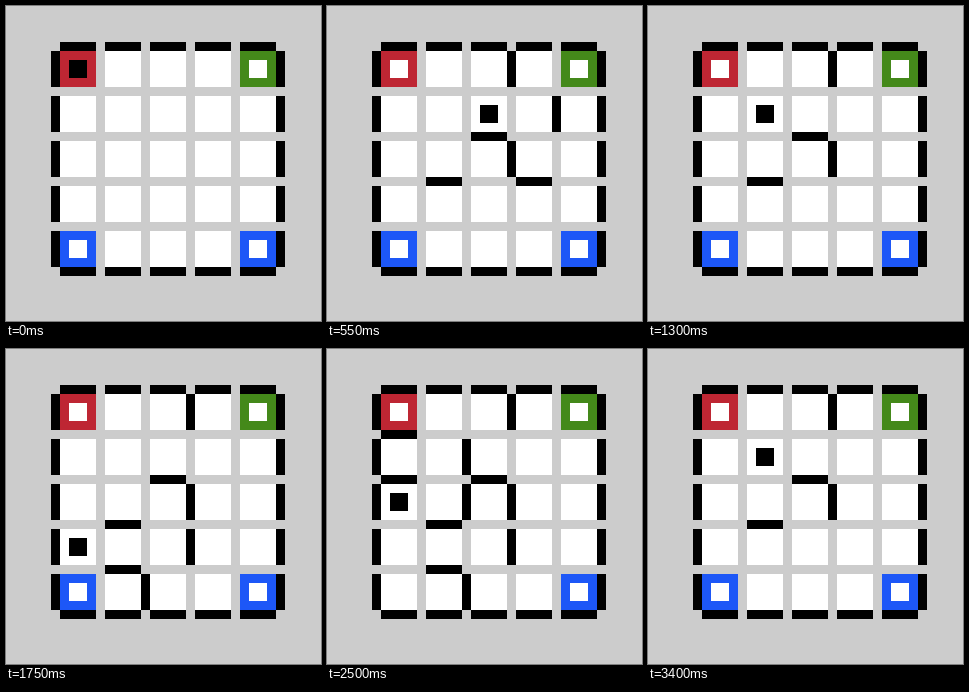
These frames come from a looping animation (315 px wide and 315 px high, 3.55 s). An HTML page:

```html
<!DOCTYPE html>
<html lang="en">
<head>
<meta charset="utf-8">
<title>Maze search</title>
<style>
  html, body { margin: 0; width: 100%; height: 100%; overflow: hidden; background: #ccc; }
  svg { display: block; width: 100vw; height: 100vh; }
</style>
</head>
<body>
<svg id="stage" viewBox="0 0 315 315" shape-rendering="crispEdges"></svg>
<script>
const UNIT = 9, TILE = 45, SIZE = 5, LOOP = 3550;
const stage = document.getElementById('stage');
const left = col => 54 + TILE * col;
const top_ = row => 45 + TILE * row;

function rect(x, y, w, h, fill) {
  const el = document.createElementNS('http://www.w3.org/2000/svg', 'rect');
  Object.entries({ x, y, width: w, height: h, fill }).forEach(([k, v]) => el.setAttribute(k, v));
  return stage.appendChild(el);
}
const square = (col, row, fill) => rect(left(col), top_(row), 36, 36, fill);
const core = (col, row, fill) => rect(left(col) + UNIT, top_(row) + UNIT, 18, 18, fill);

// A wall lies on the right (v) or bottom (h) side of a cell.
function wall(name) {
  const col = +name[1], row = +name[2];
  return name[0] === 'v'
    ? rect(left(col) + 36, top_(row), UNIT, 36, '#000')
    : rect(left(col), top_(row) + 36, 36, UNIT, '#000');
}

function goal(col, row, fill) {
  const ring = square(col, row, fill);
  core(col, row, '#fff');
  return ring;
}

// Each move into a cell may reveal walls; going back hides them again.
const moves = [
  { at: [0, 0], walls: [] },
  { at: [1, 0], walls: ['v20', 'h21'] },
  { at: [1, 1], walls: ['v22', 'h12'] },
  { at: [2, 1], walls: ['v31', 'h32'] },
  { at: [3, 1], walls: ['h42'] },
  { at: [3, 2], walls: ['v13', 'h33'] },
  'back', 'back', 'back',
  { at: [1, 2], walls: ['v23', 'h13'] },
  { at: [0, 2], walls: [] },
  { at: [0, 3], walls: ['v14'] },
  { at: [0, 4], walls: [], collect: true },
  { at: [0, 3], walls: ['h01', 'v12'] },
  { at: [0, 2], walls: ['h00', 'v11'] },
  { at: [1, 2], walls: ['h10', 'h23'] },
  ...Array(7).fill('back')
];

const stack = [];
const states = moves.map(move => {
  if (move === 'back') stack.pop();
  else stack.push(move);
  return {
    at: stack[stack.length - 1].at,
    walls: new Set(stack.flatMap(step => step.walls)),
    collected: stack.some(step => step.collect)
  };
});

for (let row = 0; row < SIZE; row++)
  for (let col = 0; col < SIZE; col++) square(col, row, '#fff');

for (let i = 0; i < SIZE; i++) {
  rect(left(i), 36, 36, UNIT, '#000');
  rect(45, top_(i), UNIT, 36, '#000');
  wall('h' + i + 4);
  wall('v' + 4 + i);
}

goal(0, 0, '#be2633');
goal(4, 0, '#44891a');
goal(4, 4, '#1d57f7');
const prize = goal(0, 4, '#1d57f7');

const names = new Set(moves.flatMap(move => move.walls || []));
const innerWalls = [...names].map(name => ({ name, el: wall(name) }));
const marker = core(0, 0, '#000');

// The first two states last 200 ms, all others 150 ms.
const stateIndex = t => t < 400 ? Math.floor(t / 200) : 2 + Math.floor((t - 400) / 150);

function draw(time) {
  const state = states[stateIndex(time % LOOP)];
  marker.setAttribute('x', left(state.at[0]) + UNIT);
  marker.setAttribute('y', top_(state.at[1]) + UNIT);
  prize.style.display = state.collected ? 'none' : '';
  for (const { name, el } of innerWalls) el.style.display = state.walls.has(name) ? '' : 'none';
}

const start = performance.now();
function tick() {
  draw(performance.now() - start);
  requestAnimationFrame(tick);
}
tick();
</script>
</body>
</html>
```
